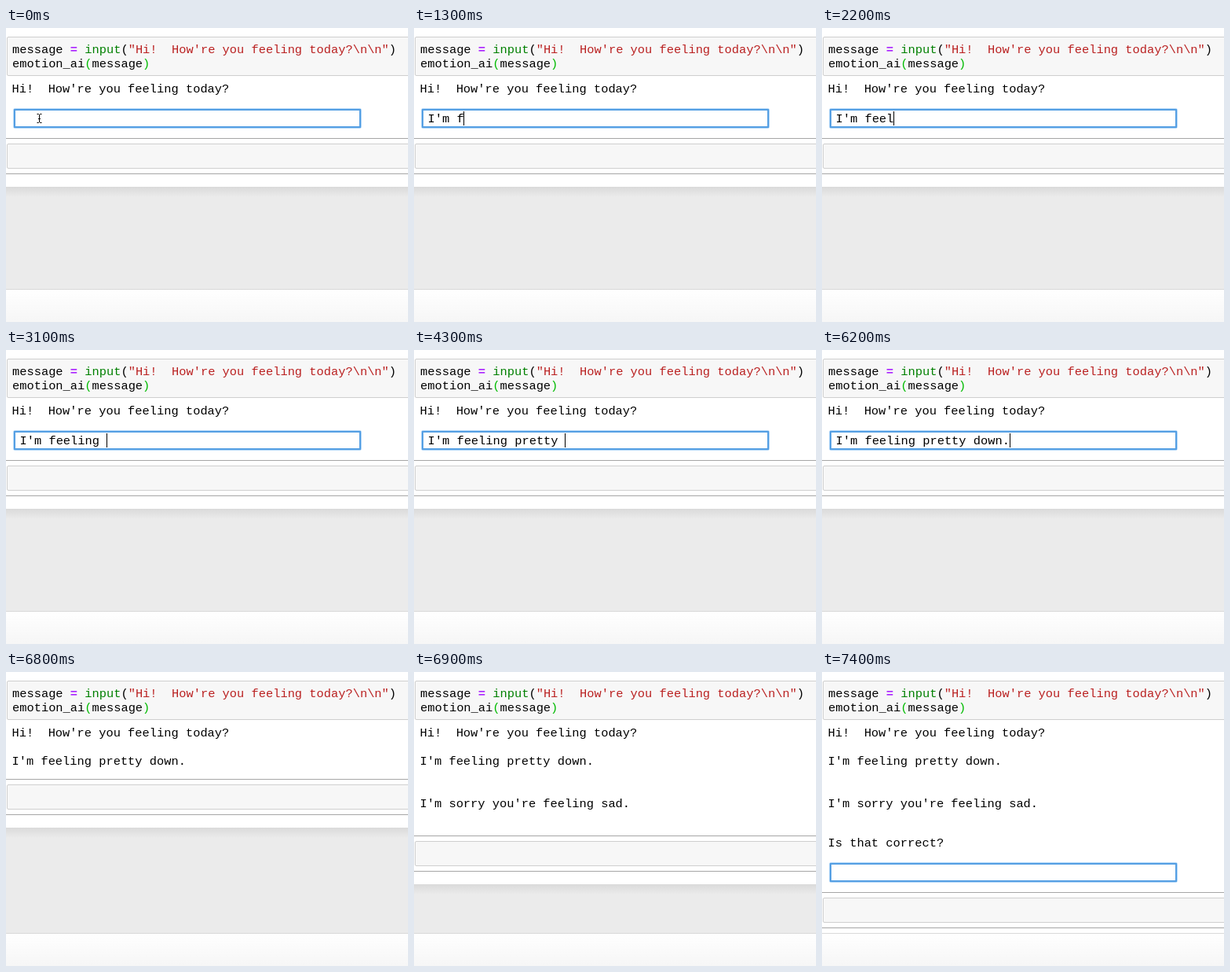
Recreate the animation shown at these times as an HTML page. Size 512 by 374 pixels, loop 8000 ms.

```html
<!DOCTYPE html>
<html lang="en">
<head>
<meta charset="utf-8">
<title>Notebook chat</title>
<style>
  html, body { margin: 0; width: 100%; height: 100%; overflow: hidden; background: #fff; }
  svg { display: block; width: 512px; height: 374px; }
  text { font: 15.38px "Liberation Mono", "Courier New", monospace; white-space: pre; }
  .cell { fill: #f7f7f7; stroke: #cfcfcf; }
  .rule { fill: #a6a6a6; }
  .operator { fill: #a2f; font-weight: bold; }
  .builtin { fill: #008000; }
  .string { fill: #ba2121; }
  .match { fill: #0b0; }
  .glow { fill: none; stroke: #8cc4f5; stroke-width: 4; opacity: .65; }
  .ring { fill: #fff; stroke: #559fe3; stroke-width: 2; }
</style>
</head>
<body>
<svg viewBox="0 0 512 374">
  <defs>
    <linearGradient id="shade" x2="0" y2="1">
      <stop stop-color="#dadada"/>
      <stop offset="1" stop-color="#ebebeb"/>
    </linearGradient>
    <linearGradient id="foot" x2="0" y2="1">
      <stop stop-color="#fff"/>
      <stop offset="1" stop-color="#f6f6f6"/>
    </linearGradient>
  </defs>
  <rect width="512" height="374" fill="#fff"/>

  <rect class="cell" x="1.5" y="11.5" width="540" height="49" rx="1.5"/>
  <text x="8" y="32">message <tspan class="operator">=</tspan> <tspan class="builtin">input</tspan>(<tspan class="string">"Hi!  How're you feeling today?\n\n"</tspan>)</text>
  <text x="8" y="50">emotion_ai<tspan class="match">(</tspan>message<tspan class="match">)</tspan></text>
  <text x="7.5" y="82">Hi!  How're you feeling today?</text>

  <text id="echo" x="7.5" y="118">I'm feeling pretty down.</text>
  <text id="reply" x="7.5" y="172">I'm sorry you're feeling sad.</text>
  <text id="question" x="7.5" y="222">Is that correct?</text>

  <g id="tail">
    <rect class="rule" width="512" height="1"/>
    <rect class="cell" x="1.5" y="7.5" width="540" height="31" rx="1.5"/>
    <rect class="rule" y="45" width="512" height="1"/>
    <rect y="62" width="512" height="200" fill="#ebebeb"/>
    <rect y="62" width="512" height="13" fill="url(#shade)"/>
  </g>
  <rect y="332" width="512" height="42" fill="url(#foot)"/>
  <rect y="332" width="512" height="1" fill="#d9d9d9"/>

  <g id="field">
    <rect class="glow" x="11" y="104" width="440" height="22" rx="1"/>
    <rect class="ring" x="11" y="104" width="440" height="22"/>
    <text id="typed" x="17.5" y="120"></text>
    <rect id="caret" y="106" width="1" height="18"/>
  </g>
  <path id="pointer" d="M39.5 109.5h2l1 1 1-1h2M42.5 110v10M39.5 120.5h2l1-1 1 1h2M41 115.5h3" fill="none" stroke="#000"/>
</svg>
<script>
  const LOOP = 8000, PITCH = 9.23;
  const SUBMIT = 6800, REPLY = 6900, ASK = 7000;
  const message = "I'm feeling pretty down.";
  const keyTimes = [
    100, 500, 800, 900, 1100, 1700, 1800, 1900, 2700, 2800, 2900, 3000,
    3500, 3600, 3800, 4000, 4100, 4200, 4300, 5000, 5100, 5300, 5400, 5500
  ];
  const caretOff = [[0, 100], [2400, 2700], [4800, 5000], [6000, 6200], [7400, LOOP]];

  const el = id => document.getElementById(id);
  const show = (id, on) => el(id).setAttribute("visibility", on ? "visible" : "hidden");
  const moveY = (id, y) => el(id).setAttribute("transform", `translate(0 ${y})`);

  function tailY(t) {
    if (t < SUBMIT) return 140;
    if (t < REPLY) return 136;
    return t < ASK ? 208 : 280;
  }

  function draw(t) {
    const asked = t >= ASK;
    const fieldOn = t < SUBMIT || asked;
    const count = asked ? 0 : keyTimes.filter(k => k <= t).length;
    const blinkedOff = caretOff.some(([from, to]) => t >= from && t < to);

    el("typed").textContent = message.slice(0, count);
    el("caret").setAttribute("x", Math.floor(17.6 + count * PITCH));
    show("caret", fieldOn && !blinkedOff);
    show("field", fieldOn);
    show("typed", fieldOn);
    moveY("field", asked ? 140 : 0);
    moveY("tail", tailY(t));
    show("pointer", t < keyTimes[0]);
    show("echo", t >= SUBMIT);
    show("reply", t >= REPLY);
    show("question", asked);
  }

  const start = performance.now();
  function tick() {
    draw((performance.now() - start) % LOOP);
    requestAnimationFrame(tick);
  }
  tick();
</script>
</body>
</html>
```
